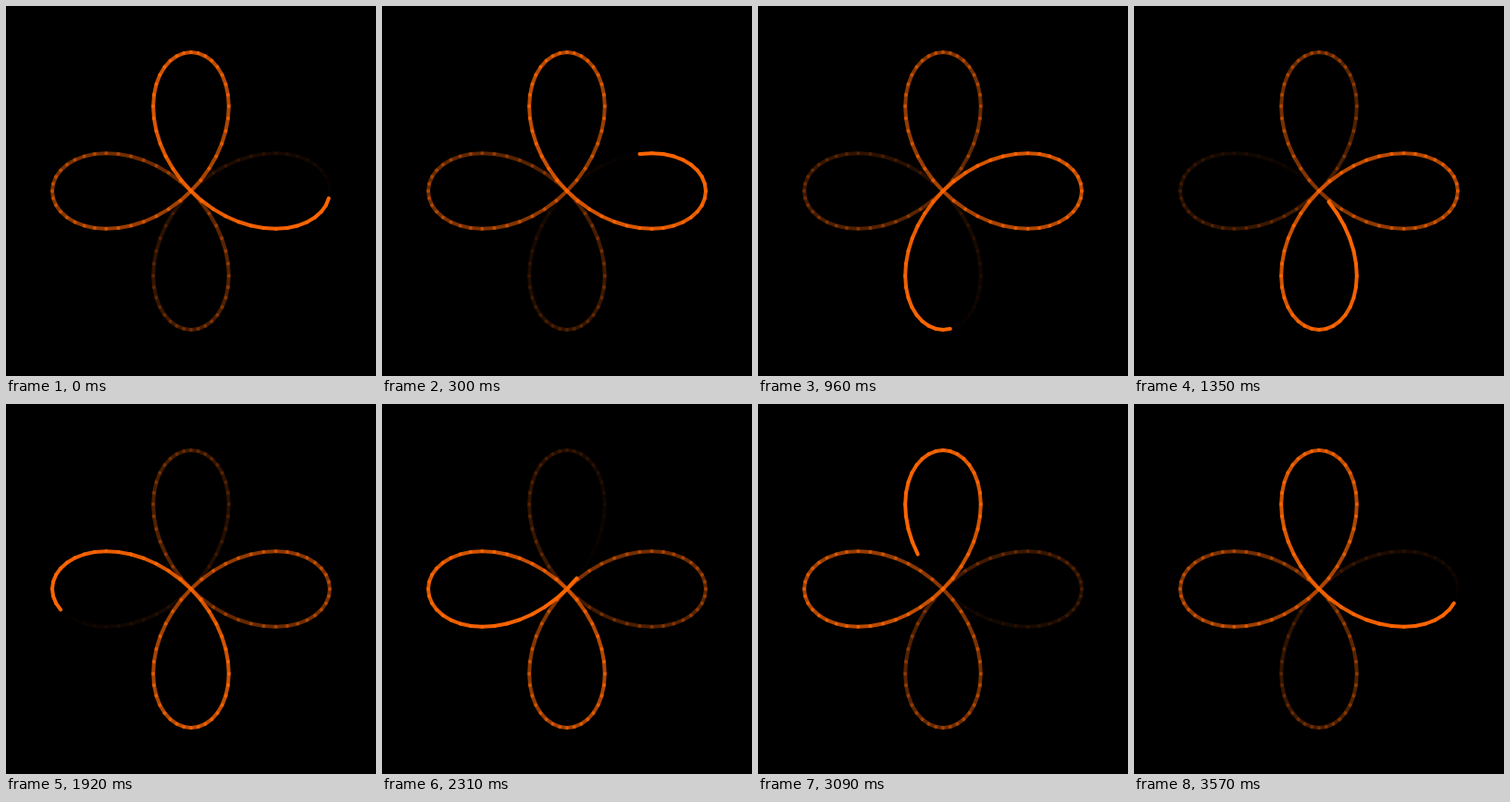
These frames come from a looping animation (400x400 px, 3600 ms). An HTML page with a canvas:

```html
<!DOCTYPE html>
<html lang="en">
<head>
<meta charset="utf-8">
<title>Rose curve</title>
<style>
  html, body { margin: 0; width: 100%; height: 100%; overflow: hidden; background: #000; }
  canvas { display: block; }
</style>
</head>
<body>
<canvas id="stage" width="400" height="400"></canvas>
<script>
const ctx = document.getElementById('stage').getContext('2d');
const STEPS = 120, STEP_MS = 30, RADIUS = 150, CENTER = 200;

// Four-petal rose: r = cos(2θ), counter-clockwise on screen
function rosePoint(step) {
  const angle = step * 2 * Math.PI / STEPS;
  const r = RADIUS * Math.cos(2 * angle);
  return [CENTER + r * Math.cos(angle), CENTER - r * Math.sin(angle)];
}

function draw(head) {
  ctx.globalAlpha = 1;
  ctx.fillStyle = '#000';
  ctx.fillRect(0, 0, 400, 400);
  ctx.strokeStyle = '#ff6600';
  ctx.lineWidth = 4;
  ctx.lineCap = 'round';
  // Oldest segment first; overlapping translucent caps make the beads
  for (let age = STEPS - 1; age >= 0; age--) {
    ctx.globalAlpha = 1 - age / STEPS;
    ctx.beginPath();
    ctx.moveTo(...rosePoint(head - age - 1));
    ctx.lineTo(...rosePoint(head - age));
    ctx.stroke();
  }
}

const start = performance.now();
function tick() {
  const step = Math.floor((performance.now() - start) / STEP_MS) % STEPS;
  draw(step - 1);
  requestAnimationFrame(tick);
}
tick();
</script>
</body>
</html>
```
